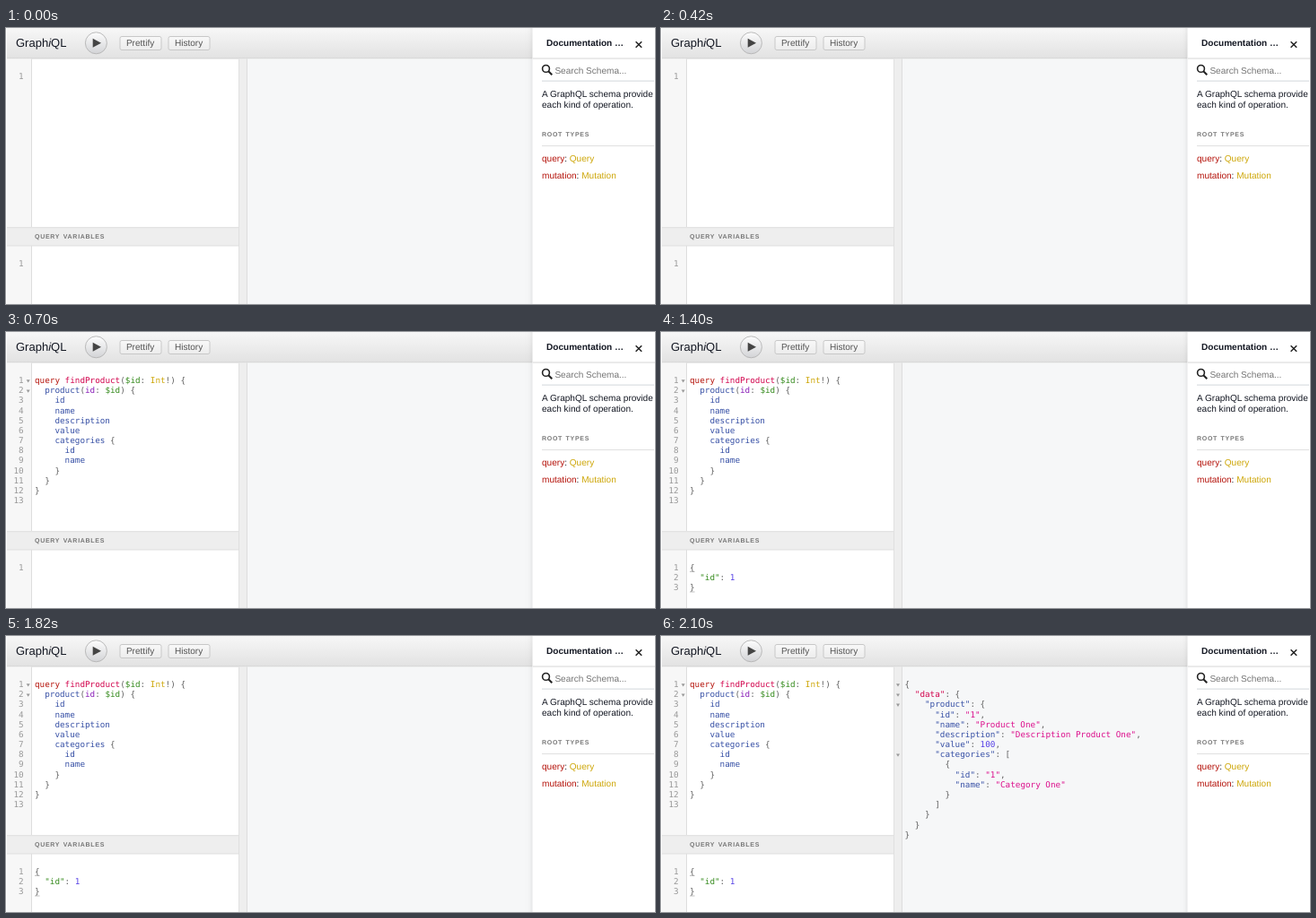
An HTML page with a canvas that plays this animation: 723x308 px, repeating every 2800 ms.

```html
<!DOCTYPE html>
<html lang="en">
<head>
<meta charset="utf-8">
<title>GraphiQL session</title>
<style>
  html, body { margin: 0; width: 100%; height: 100%; overflow: hidden; background: #fff; }
  canvas { display: block; }
</style>
</head>
<body>
<canvas id="stage" width="723" height="308"></canvas>
<script>
const ctx = document.getElementById('stage').getContext('2d');
const W = 723, H = 308, STEP = 700, STEPS = 4;
const SANS = '"Liberation Sans", Arial, sans-serif';
const MONO = '"DejaVu Sans Mono", monospace';
const UI = `10.07px ${SANS}`;
const CODE = `9.3px ${MONO}`;
const CELL = 5.6, LINE = 11.18, QUERY_Y = 57, VARIABLES_Y = 266;
const INK = '#141823', PUNCT = '#606060', RED = '#b5140c', GOLD = '#cea70a';
const GREEN = '#388c20', BLUE = '#3851a6', NUMBER = '#5540e6', CRIMSON = '#d2054e';

// Each rule pairs a pattern with its colour; the first match wins.
const QUERY_RULES = [
  [/^query/, RED], [/^findProduct/, CRIMSON], [/^\$\w+/, GREEN],
  [/^Int/, GOLD], [/^id(?=:)/, '#8b20b9'], [/^\w+/, BLUE]
];
const jsonRules = keyColor => [
  [/^"[^"]*"(?=:)/, keyColor], [/^"[^"]*"/, '#dc0f8c'], [/^\d+/, NUMBER]
];
const VARIABLE_RULES = jsonRules(GREEN);
const RESULT_RULES = [[/^"data"/, CRIMSON], ...jsonRules(BLUE)];

const QUERY = `query findProduct($id: Int!) {
  product(id: $id) {
    id
    name
    description
    value
    categories {
      id
      name
    }
  }
}
`.split('\n');

const VARIABLES = ['{', '  "id": 1', '}'];

const RESULT = JSON.stringify({
  data: {
    product: {
      id: '1',
      name: 'Product One',
      description: 'Description Product One',
      value: 100,
      categories: [{ id: '1', name: 'Category One' }]
    }
  }
}, null, 2).split('\n');

function rect(x, y, w, h, color) {
  ctx.fillStyle = color;
  ctx.fillRect(x, y, w, h);
}

function text(str, x, y, color = INK, font = UI) {
  ctx.font = font;
  ctx.fillStyle = color;
  ctx.fillText(str, x, y);
  return x + ctx.measureText(str).width;
}

function vertical(y0, y1, from, to) {
  const g = ctx.createLinearGradient(0, y0, 0, y1);
  g.addColorStop(0, from);
  g.addColorStop(1, to);
  return g;
}

function path(points, close) {
  ctx.beginPath();
  points.forEach(([x, y]) => ctx.lineTo(x, y));
  if (close) ctx.closePath();
}

function stroke(color, width) {
  ctx.strokeStyle = color;
  ctx.lineWidth = width;
  ctx.stroke();
}

function heading(str, x, y) {
  ctx.letterSpacing = '0.716px';
  text(str, x, y, '#777', `small-caps bold 10.07px ${SANS}`);
  ctx.letterSpacing = '0px';
}

function code(lines, x, y, rules) {
  lines.forEach((line, row) => {
    let col = 0;
    while (col < line.length) {
      const rest = line.slice(col);
      const rule = rules.find(([pattern]) => pattern.test(rest));
      const token = rule ? rest.match(rule[0])[0] : rest[0];
      text(token, x + col * CELL, y + row * LINE, rule ? rule[1] : PUNCT, CODE);
      col += token.length;
    }
  });
}

function lineNumbers(count, y) {
  for (let n = 1; n <= count; n++) {
    text(String(n), 19.6 - String(n).length * CELL, y + (n - 1) * LINE, '#999', CODE);
  }
}

function foldMarks(rows, x) {
  for (const row of rows) {
    const y = 53.2 + row * LINE;
    path([[x - 2, y], [x + 2, y], [x, y + 3.4]], true);
    ctx.fillStyle = '#999';
    ctx.fill();
  }
}

function button(label, x, w) {
  ctx.beginPath();
  ctx.roundRect(x + .5, 9.5, w - 1, 15, 2);
  ctx.fillStyle = vertical(9, 25, '#f9f9f9', '#ececec');
  ctx.fill();
  stroke('#c8c8c8', 1);
  text(label, x + 7.4, 20, '#555');
}

function toolbar() {
  rect(1, 0, W, 34, vertical(0, 34, '#f7f7f7', '#e2e2e2'));
  rect(1, 33.5, W, 1, '#d2d2d2');
  const logo = `13px ${SANS}`;
  let x = text('Graph', 11, 21, INK, logo);
  x = text('i', x, 21, INK, `italic ${logo}`);
  text('QL', x, 21, INK, logo);

  ctx.beginPath();
  ctx.arc(100.4, 16.8, 12, 0, Math.PI * 2);
  ctx.fillStyle = vertical(5, 29, '#fdfdfd', '#d2d3d6');
  ctx.fill();
  stroke('#b4b4b4', .9);
  path([[96.7, 11.8], [96.7, 21.8], [106, 16.8]], true);
  ctx.fillStyle = '#444';
  ctx.fill();

  button('Prettify', 126.5, 47);
  button('History', 180.5, 47);
}

function panes() {
  rect(1, 34.5, 27, H, '#f7f7f7');
  rect(28, 34.5, 1, H, '#ddd');
  rect(259, 34.5, 9, H, '#eee');
  rect(259, 34.5, 1, H, '#e0e0e0');
  rect(268, 34.5, 1, H, '#ddd');
  rect(269, 34.5, 318, H, '#f6f7f8');
  rect(1, 222, 258, 21, '#eee');
  rect(1, 222.4, 258, .8, '#dcdcdc');
  rect(1, 242.5, 258, 1, '#e0e0e0');
  heading('query variables', 32, 235.4);
}

function rootType(name, type, y) {
  let x = text(name, 597, y, RED);
  x = text(': ', x, y);
  text(type, x, y, GOLD);
}

function docs() {
  ctx.save();
  ctx.shadowColor = 'rgba(0,0,0,.15)';
  ctx.shadowBlur = 6;
  rect(586.5, -10, 160, H + 20, '#fff');
  ctx.restore();

  text('Documentation …', 602, 20.2, INK, `bold 10.07px ${SANS}`);
  path([[701.6, 15.2], [708.2, 21.8]]);
  stroke('#222', 1.5);
  path([[708.2, 15.2], [701.6, 21.8]]);
  stroke('#222', 1.5);
  rect(587, 33.5, 136, 1, '#d6d6d6');

  ctx.beginPath();
  ctx.arc(601.5, 45.4, 3.9, 0, Math.PI * 2);
  stroke('#222', 1.6);
  path([[604.3, 48.2], [608.3, 52.2]]);
  stroke('#222', 2);
  text('Search Schema...', 611.4, 51, '#757575');
  rect(597, 58.6, 125, 1, '#d3d6db');

  text('A GraphQL schema provide', 597, 77.4);
  text('each kind of operation.', 597, 88.5);
  heading('root types', 597, 121.1);
  rect(597, 131, 125, 1, '#e0e0e0');
  rootType('query', 'Query', 148.8);
  rootType('mutation', 'Mutation', 167.8);
}

function draw(step) {
  rect(0, 0, W, H, '#fff');
  toolbar();
  panes();

  const hasQuery = step >= 1, hasVariables = step >= 2, hasResult = step >= 3;
  lineNumbers(hasQuery ? QUERY.length : 1, QUERY_Y);
  lineNumbers(hasVariables ? VARIABLES.length : 1, VARIABLES_Y);
  if (hasQuery) {
    code(QUERY, 32, QUERY_Y, QUERY_RULES);
    foldMarks([0, 1], 24.7);
  }
  if (hasVariables) {
    code(VARIABLES, 32, VARIABLES_Y, VARIABLE_RULES);
    rect(32, 267.4, CELL, .6, '#999');
    rect(32, 289.7, CELL, .6, '#999');
  }
  if (hasResult) {
    code(RESULT, 271.6, QUERY_Y, RESULT_RULES);
    foldMarks([0, 1, 2, 7], 264);
  }
  docs();
}

ctx.textRendering = 'geometricPrecision';
const start = performance.now();
function frame() {
  draw(Math.floor((performance.now() - start) / STEP) % STEPS);
  requestAnimationFrame(frame);
}
frame();
</script>
</body>
</html>
```
